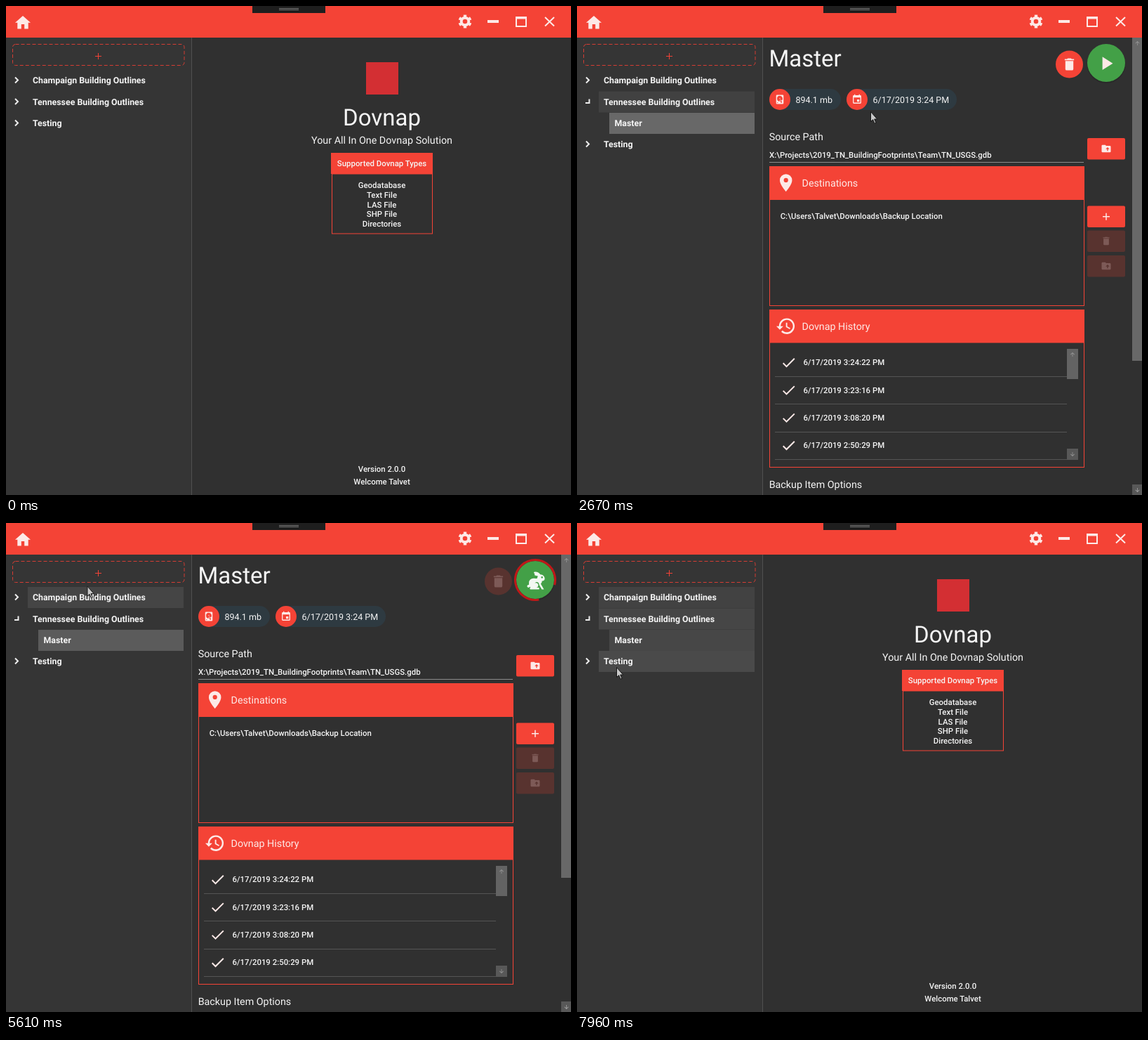
Recreate the animation shown at these times as an HTML page. Size 805x696 px, loop 8 s.

```html
<!DOCTYPE html>
<html lang="en">
<head>
<meta charset="utf-8">
<style>
html, body { margin: 0; width: 100%; height: 100%; overflow: hidden; background: #303030; }
svg { display: block; width: 805px; height: 696px; font-family: Roboto, sans-serif; fill: #f5f5f5; text-rendering: geometricPrecision; }
text { white-space: pre; }
</style>
</head>
<body>
<svg id="stage" viewBox="0 0 805 696"></svg>
<script>
const RED = '#f44336', PALE = '#fde9e7', DIM = '#58332f', SMALL = 11.4;
const LOOP = 8000, STEP = 77.4, LEAD = 42;

const icons = {
  home: 'M10 20V14H14V20H19V12H22L12 3L2 12H5V20Z',
  trash: 'M19 4H15.5L14.5 3H9.5L8.5 4H5V6H19ZM6 19A2 2 0 0 0 8 21H16A2 2 0 0 0 18 19V7H6Z',
  play: 'M8 5.1V19.1L19 12.1Z',
  disk: 'M6 2H18A2 2 0 0 1 20 4V20A2 2 0 0 1 18 22H6A2 2 0 0 1 4 20V4A2 2 0 0 1 6 2M12 4A6 6 0 0 0 12 16L11.2 13.8L13.8 12.3L15.7 14.7A6 6 0 0 0 12 4M12 9A1 1 0 0 1 12 11A1 1 0 0 1 12 9M7 18A1 1 0 0 0 7 20A1 1 0 0 0 7 18M12.1 13.3L14.6 19.6L17.2 18.1L13 12.8Z',
  calendar: 'M19 19H5V8H19ZM16 1V3H8V1H6V3H5A2 2 0 0 0 3 5V19A2 2 0 0 0 5 21H19A2 2 0 0 0 21 19V5A2 2 0 0 0 19 3H18V1ZM17 12H12V17H17Z',
  folder: 'M20 6A2 2 0 0 1 22 8V18A2 2 0 0 1 20 20H4A2 2 0 0 1 2 18V6A2 2 0 0 1 4 4H10L12 6ZM10.8 13H14V17H16V13H19.2L15 8.8Z',
  pin: 'M12 11.5A2.5 2.5 0 0 1 12 6.5A2.5 2.5 0 0 1 12 11.5M12 2A7 7 0 0 0 5 9C5 14.2 12 22 12 22S19 14.2 19 9A7 7 0 0 0 12 2Z',
  history: 'M13.5 8H12V13L16.3 15.5L17 14.3L13.5 12.2ZM13 3A9 9 0 0 0 4 12H1L5 16L9 12H6A7 7 0 1 1 8.1 16.9L6.6 18.4A9 9 0 1 0 13 3',
  check: 'M21 7L9 19L3.5 13.5L4.9 12.1L9 16.2L19.6 5.6Z',
  up: 'M11 20V8L5.5 13.5L4 12L12 4L20 12L18.5 13.5L13 8V20Z',
  down: 'M11 4V16L5.5 10.5L4 12L12 20L20 12L18.5 10.5L13 16V4Z',
  rabbit: 'M18 21L15.3 16.3C15.3 13.2 12 12.6 10.9 14.7C13 13.7 14.4 15.3 14.4 16.7A2.4 2.4 0 0 1 12 19.1H15.3V21H6.8C6 21 5.5 20 6.1 19.4L6.6 18.9L5.7 18.3A1.4 1.4 0 1 1 4.4 16.3L4.9 16.3V14.4A4.7 4.7 0 0 1 9.6 9.6C11.8 9.6 13.4 10.5 13.4 9.2L14 7.3L11.5 6.8C10.4 6.7 10.2 5.3 11.2 4.9L10.6 4.9A1 1 0 0 1 10.6 3H11.5C13.6 3 15.5 4.1 16.5 5.8C18.6 5.7 21 7.5 21 10.1A2.4 2.4 0 0 1 18.2 12.4C18.2 13.6 17.7 14.6 16.9 15.3L20.2 21ZM18.2 7.7A.95 .95 0 0 0 18.2 9.6A.95 .95 0 0 0 18.2 7.7Z'
};

const icon = (name, x, y, s, fill = PALE) =>
  `<path d="${icons[name]}" fill="${fill}" fill-rule="evenodd" transform="translate(${x} ${y}) scale(${s}) translate(-12 -12)"/>`;
const rect = (x, y, w, h, fill, more = '') =>
  `<rect x="${x}" y="${y}" width="${w}" height="${h}" fill="${fill}" ${more}/>`;
const circle = (x, y, r, fill, more = '') => `<circle cx="${x}" cy="${y}" r="${r}" fill="${fill}" ${more}/>`;
const line = (d, color, w = 1, more = '') => `<path d="${d}" fill="none" stroke="${color}" stroke-width="${w}" ${more}/>`;
const text = (s, x, y, size, more = '') =>
  `<text x="${x}" y="${y}" font-size="${size}" ${size === SMALL ? 'font-weight="500"' : ''} ${more}>${s}</text>`;
const mid = (s, y, size) => text(s, 535.5, y, size, 'text-anchor="middle"');
const group = (id, body) => `<g id="${id}">${body}</g>`;

const label = (s, x, y) => text(s, x, y, 12.35, 'font-weight="700"');
const chevron = y => line(`M13 ${y - 4}L17 ${y}L13 ${y + 4}`, '#eee', 2);
const shade = (id, x, y) => rect(x, y, 253 - x, 30, '#fff', `id="${id}" opacity="0"`);
const button = (y, name, on) => rect(727, y, 54, 30.5, on ? RED : DIM, 'rx="2"') +
  (name ? icon(name, 754, y + 15, .65, on ? PALE : '#7d5a57') : '');
const card = (y, h, head, name, title) =>
  rect(274.5, y + .5, 448, h - 1, 'none', `stroke="${RED}"`) + rect(274, y, 449, head, RED) +
  icon(name, 297.7, y + 23.7, 1.25) + text(title, 320.5, y + 28.7, 14.3, `fill="${PALE}"`);
const chip = (x, w, name, s) => rect(x, 118, w, 30, '#2e3a41', 'rx="15"') +
  circle(x + 15, 133, 15, RED) + icon(name, x + 15, 133, .66) + text(s, x + 37.5, 137.7, 12.5);

const header = rect(0, 0, 805, 45, RED) + icon('home', 24, 23.8, 1.1) +
  rect(351, 0, 104, 10, '#1e1e1e') + line('M389 3.5H417M389 5.5H417', '#777') +
  circle(654, 22, 5.3, 'none', `stroke="${PALE}" stroke-width="4"`) +
  circle(654, 22, 7.7, 'none', `stroke="${PALE}" stroke-width="3.8" pathLength="6" stroke-dasharray=".5" transform="rotate(15 654 22)"`) +
  rect(686, 20, 16, 4, PALE) + line('M727 16.5H741V29H727Z', PALE, 2) + rect(726, 15, 16, 3.5, PALE) +
  line('M768 16L781 28.5M781 16L768 28.5', PALE, 2);

const sidebar = rect(0, 45, 264, 651, '#353535') + rect(264, 45, 1, 651, '#505050') +
  rect(9.5, 54.5, 244.5, 30, 'none', 'rx="4" stroke="#d63d33" stroke-dasharray="5 3"') +
  line('M127 71.5H136M131.500 67V76', RED) +
  shade('champ', 31, 91) + shade('tenn', 31, 121.5) + shade('mast', 46, 152) + shade('test', 31, 182) +
  circle(15, 136, 14, '#fff', 'id="ripple" opacity="0"') +
  chevron(105.5) + label('Champaign Building Outlines', 38, 110) +
  group('closed', chevron(136)) + group('open', line('M12 138H17.5V132.5', '#eee', 2)) +
  label('Tennessee Building Outlines', 38, 140.6) +
  group('child', label('Master', 53.5, 171.3)) +
  group('last', chevron(166.5) + label('Testing', 38, 171.3));

const home = rect(513, 80, 46, 46, '#d32f33') +
  mid('Dovnap', 169.5, 33) + mid('Your All In One Dovnap Solution', 196, 14.35) +
  rect(464.5, 239, 143, 85, 'none', `stroke="${RED}"`) + rect(463, 209, 145, 30, RED) +
  mid('Supported Dovnap Types', 228, SMALL) +
  ['Geodatabase', 'Text File', 'LAS File', 'SHP File', 'Directories']
    .map((s, i) => mid(s, 258.6 + i * 13.95, SMALL)).join('') +
  mid('Version 2.0.0', 662.5, SMALL) + mid('Welcome Talvet', 680.7, SMALL);

const history = ['3:24:22', '3:23:16', '3:08:20', '2:50:29'].map((s, i) => {
  const y = 507 + i * 39.3;
  return icon('check', 301.5, y + .5, 1) + text(`6/17/2019 ${s} PM`, 322.5, y + 4.2, SMALL) +
    line(`M282 ${Math.round(y + 20) + .5}H698`, '#555');
}).join('');

const detail = text('Master', 273.5, 85.5, 33) +
  group('trash', circle(701.5, 83, 19.5, RED) + icon('trash', 701.5, 83, .95)) +
  group('trashOff', circle(701.5, 83, 19.5, DIM) + icon('trash', 701.5, 83, .95, '#7d5a57')) +
  circle(754, 82.5, 27.5, '#222', 'opacity=".5"') + circle(754, 81, 27, '#43a047') +
  group('idle', icon('play', 754, 81.5, 1.35)) +
  group('busy', circle(754, 81, 28.5, 'none', 'id="ring" stroke="#c01818" stroke-width="3" pathLength="1"') +
    group('rabbit', icon('rabbit', 755, 82, 1.4, '#f3f8f3'))) +
  chip(274, 102, 'disk', '894.1 mb') + chip(384, 157, 'calendar', '6/17/2019 3:24 PM') +
  text('Source Path', 273.7, 190.5, 14.3) +
  text('X:\\Projects\\2019_TN_BuildingFootprints\\Team\\TN_USGS.gdb', 274, 215.5, SMALL) +
  line('M274 222.5H722', '#8c8c8c') + button(188, 'folder', true) +
  card(228, 199, 48, 'pin', 'Destinations') +
  text('C:\\Users\\Talvet\\Downloads\\Backup Location', 289.7, 302.7, SMALL) +
  button(284.5, '', true) + line('M749 299.7H759M754 294.7V304.7', PALE, 1.5) +
  button(319.5, 'trash', false) + button(355, 'folder', false) +
  card(432, 225, 47.5, 'history', 'Dovnap History') + history +
  rect(698, 488, 16, 43, '#636363') + icon('up', 706, 496, .38, '#999') +
  rect(698, 630, 16, 16, '#585858') + icon('down', 706, 638, .38, '#999') +
  text('Backup Item Options', 273.7, 685.5, 14.3) +
  rect(791, 45, 14, 460, '#686868') + icon('up', 798.5, 53, .38, '#999') +
  rect(791, 681, 14, 15, '#585858') + icon('down', 798.5, 689, .38, '#aaa');

const pointers =
  group('arrow', '<path d="M.5 .5V14.5L3.6 11.7L6 17.200L8 16.3L5.700 11H9.7Z" fill="#c8c8c8" stroke="#161616"/>') +
  group('hand', '<path d="M-2 1Q0-2 2 1V8Q4 6 5 8.5Q7 7 8 9.5Q11 8.5 11 12V16L8 21H0L-6 12Q-6 9-2 12Z" fill="#d873cf" stroke="#151515" stroke-width="1.3"/>');

const stage = document.getElementById('stage');
stage.innerHTML = sidebar + group('home', home) + group('detail', detail) + header + pointers;
const el = {};
stage.querySelectorAll('[id]').forEach(e => el[e.id] = e);

// Keys are [time, value...]; values are held outside their range.
function at(t, keys, smooth) {
  const i = keys.findIndex(k => k[0] > t);
  if (i < 0) return keys.at(-1).slice(1);
  if (i === 0) return keys[0].slice(1);
  const a = keys[i - 1], b = keys[i];
  let p = (t - a[0]) / (b[0] - a[0]);
  if (smooth) p = p * p * (3 - 2 * p);
  return a.slice(1).map((v, n) => v + (b[n + 1] - v) * p);
}

const path = [
  [35, 716, 666], [575, 21, 126], [730, 21, 126], [960, 13, 131], [1360, 13, 131], [1580, 28, 138],
  [1815, 55, 158], [1970, 62, 163], [2200, 62, 163], [2667, 418, 150], [2980, 614, 114],
  [3580, 757, 82], [4610, 757, 82], [5370, 119, 119], [5605, 116, 90],
  [6220, 18, 15], [6380, 18, 15], [7000, 71, 113], [7075, 71, 138], [7230, 71, 142],
  [7540, 71, 142], [7695, 60, 109], [7930, 56, 205]
];

const hover = {
  champ: [[5370, 0], [5450, .1], [5605, .08], [5850, 0], [7540, 0], [7620, .1], [7700, .1], [7930, .065]],
  tenn: [[420, 0], [500, .1], [730, .1], [960, 0], [1480, 0], [1600, .105], [1950, .105], [2667, .06], [2970, 0], [7775, 0], [7850, .1], [7930, .085]],
  mast: [[1890, 0], [1970, .1], [2200, .1], [2280, .25], [2667, .25], [2970, .19], [6400, .19], [6401, 0], [7775, 0], [7850, .1], [7930, .09]],
  test: [[7850, 0], [7930, .105]],
  ripple: [[1340, 0], [1420, .15], [1750, 0]]
};

const show = (id, on) => el[id].style.display = on ? '' : 'none';

function draw(t) {
  const expanded = t >= 1400, inDetail = t >= 2270 && t < 6400, busy = t >= 3740;
  show('home', !inDetail);
  show('detail', inDetail);
  show('closed', !expanded);
  show('open', expanded);
  show('trash', !busy);
  show('trashOff', busy);
  show('idle', !busy);
  show('busy', busy);

  for (const id in hover) el[id].setAttribute('opacity', at(t, hover[id])[0]);
  const [drop] = at(t, [[1400, 0], [1900, 30]], true);
  el.last.setAttribute('transform', `translate(0 ${drop})`);
  el.child.setAttribute('opacity', at(t, [[1450, 0], [1750, 1]])[0]);

  const swing = (1 - Math.cos((t - 5610) * Math.PI * 3 / 1000)) / 2;
  el.rabbit.setAttribute('transform', `rotate(${swing * 14} 754 82)`);
  el.ring.setAttribute('stroke-dasharray', `${.82 + .18 * swing} 1`);
  el.ring.setAttribute('transform', `rotate(${80 + (t - 5610) * .36} 754 81)`);

  const [x, y] = at(t, path), onPlay = inDetail && Math.hypot(x - 754, y - 81) < 28;
  show('arrow', t > 0 && !onPlay);
  show('hand', onPlay);
  el.arrow.setAttribute('transform', `translate(${x} ${y})`);
  el.hand.setAttribute('transform', `translate(${x} ${y})`);
}

// The screen refreshes about 13 times a second, so poses are held between steps.
const start = performance.now();
function tick() {
  const t = (performance.now() - start) % LOOP;
  draw(Math.floor((t + LEAD) / STEP) * STEP - LEAD);
  requestAnimationFrame(tick);
}
tick();
</script>
</body>
</html>
```
